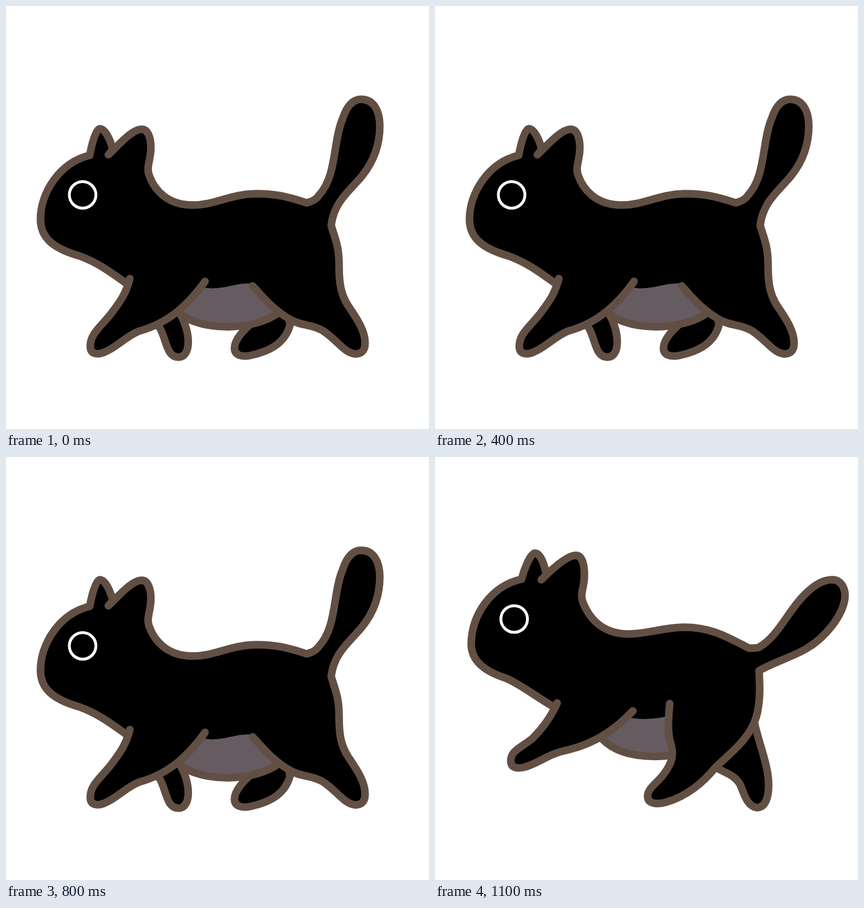
Animation, 748 px wide and 748 px high, one loop 1200 ms. Source, as an HTML page with a canvas:

```html
<!DOCTYPE html>
<html lang="en">
<head>
<meta charset="utf-8">
<title>Walking cat</title>
<style>
html, body { margin: 0; width: 100%; height: 100%; overflow: hidden; background: #fff; }
canvas { display: block; width: 748px; height: 748px; }
</style>
</head>
<body>
<canvas width="748" height="748"></canvas>
<script>
const ctx = document.querySelector('canvas').getContext('2d');
const FUR = '#000', LINE = '#624f44', BELLY = '#675b62';

// Every pose uses the same path commands, so two poses can be blended.
// body: chin, head, ears, back, tail; hind: rump and near hind leg; hem: upper belly edge
const contact = {
  eye: '135.5 334',
  body: 'M212 490C180 467 160 453 130 442C85 429 61 411 61 377C61 331 94 277 148 264C151 248 158 217 166 217C175 217 184 235 189 254L181 263C200 245 222 219 239 218C252 217 257 236 256 255C255 275 248 285 253 299C262 325 285 352 330 352C370 352 395 333 440 332C480 331 505 340 532 348C545 345 550 340 554 334C585 300 578 240 595 200C603 175 615 165 628 165C650 165 661 185 661 212C661 245 650 275 630 300C610 325 580 345 575 388',
  hind: 'C583 415 589 425 589 460C589 490 592 510 605 530C622 555 635 575 635 596C635 612 626 616 616 615C598 613 585 590 560 574C540 562 520 566 500 553C470 535 455 515 436 495',
  hem: 'L436 491C405 488 385 504 350 498',
  front: 'M219 482C212 510 200 525 185 545C165 570 149 580 149 602C149 615 160 617 172 613C195 605 210 585 235 575C290 560 325 525 352 487',
  farFront: 'M265 560C285 580 280 621 305 621C328 621 328 575 305 540L290 535',
  farHind: 'M450 545C430 565 404 585 404 605C404 618 418 621 432 618C460 612 492 600 502 565L500 545',
  belly: 'M345 477L300 535C330 577 440 577 485 540L445 477'
};

const down = {
  eye: '135.5 338',
  body: 'M230 497C190 480 162 458 130 446C85 433 61 414 61 381C61 333 94 280 147 267C151 251 158 220 166 220C175 220 184 238 189 257L181 266C200 248 222 221 238 221C252 220 257 240 255 258C254 278 248 290 252 302C262 328 285 354 330 354C370 354 395 335 440 333C480 332 505 342 535 349C545 346 552 342 560 336C592 305 592 250 612 212C622 190 638 179 655 179C675 180 683 198 682 218C681 261 659 297 628 324C601 348 580 361 575 392',
  hind: 'C583 420 584 445 579 470C574 490 562 505 564 525C567 550 572 560 569 580C567 600 558 614 542 614C528 614 526 600 522 585C517 565 515 560 495 552C455 535 428 505 422 465',
  hem: 'L428 492C405 490 390 506 354 501',
  front: 'M232 494C229 520 222 540 212 558C198 580 178 592 178 610C178 623 190 625 204 622C240 611 255 595 280 583C310 553 348 522 360 474',
  farFront: 'M275 582C290 596 305 599 316 597C331 592 330 572 316 558L300 550',
  farHind: 'M450 546C475 565 485 570 480 585C474 600 463 608 467 618C473 625 490 623 504 618C520 612 525 606 530 600L495 535',
  belly: 'M350 485L318 543C345 575 425 572 475 545L430 485'
};

const reach = {
  eye: '140 286.5',
  body: 'M212 443C180 425 150 401 125 391C88 379 64 361 64 330C65 279 99 228 153 216C157 201 168 170 177 170C186 170 193 188 197 208L188 217C205 200 232 175 248 174C262 173 265 195 264 215C262 238 256 242 262 258C275 290 300 312 340 313C375 313 400 302 440 301C490 301 520 320 555 338C562 338 568 338 572 337C607 318 625 270 655 242C672 225 688 217 702 217C720 217 726 235 725 248C722 280 690 320 655 340C630 354 595 365 573 378',
  hind: 'C575 410 575 435 568 460C556 500 520 525 495 550C475 575 445 600 410 610C390 616 376 612 376 600C376 585 395 575 405 560C420 540 424 525 415 500C411 480 413 460 415 436',
  hem: 'L413 458C395 462 375 465 352 462',
  front: 'M216 435C205 460 190 480 172 498C150 515 134 520 134 537C134 550 145 552 160 548C190 538 200 525 235 518C290 505 325 475 350 449',
  farFront: 'M270 470C275 490 280 490 285 490C290 490 290 480 285 470L275 465',
  farHind: 'M495 548C515 560 530 562 540 580C547 598 553 618 569 620C584 620 590 603 590 580C590 545 572 505 565 470L540 500',
  belly: 'M340 445L295 498C325 530 375 533 425 527L420 445'
};

const plant = {
  ...reach,
  body: reach.body.replace('M212 443C180 425', 'M225 456C190 430'),
  hind: 'C575 410 575 435 568 460C556 500 520 525 495 550C475 575 445 597 415 608C396 614 383 612 383 600C383 587 398 577 407 560C420 540 424 525 415 500C411 480 413 460 415 436',
  front: 'M225 456C245 480 262 505 264 530C266 555 258 575 258 600C258 615 264 620 272 620C288 620 296 605 304 585C318 555 354 510 354 429',
  farFront: 'M205 448C170 500 170 535 182 546C202 560 225 522 248 510L235 465',
  farHind: 'M495 548C515 560 535 565 545 583C553 600 560 616 575 620C590 620 597 605 597 585C597 550 578 510 567 470L540 500'
};

const NUM = /\d+(\.\d+)?/g;

// Pose halfway between a and b
function between(a, b) {
  const pose = {};
  for (const part in a) {
    const other = b[part].match(NUM);
    let i = 0;
    pose[part] = a[part].replace(NUM, n => (+n + +other[i++]) / 2);
  }
  return pose;
}

const liftReach = between(down, reach), liftPlant = between(down, plant);
const walk = [
  contact, down, liftReach, reach,
  contact, down, liftPlant, plant,
  contact, down, liftReach, reach
];

function shape(line, color, extra = '') {
  ctx.fillStyle = color;
  ctx.fill(new Path2D(line + extra));
  ctx.stroke(new Path2D(line));
}

function draw(pose) {
  ctx.fillStyle = '#fff';
  ctx.fillRect(0, 0, 748, 748);
  ctx.lineCap = ctx.lineJoin = 'round';
  ctx.lineWidth = 13.5;
  ctx.strokeStyle = LINE;
  shape(pose.farFront, FUR);
  shape(pose.farHind, FUR);
  shape(pose.belly, BELLY);
  shape(pose.body + pose.hind, FUR, pose.hem);
  shape(pose.front, FUR);

  const [x, y] = pose.eye.split(' ').map(Number);
  ctx.beginPath();
  ctx.arc(x, y, 23.5, 0, Math.PI * 2);
  ctx.lineWidth = 5;
  ctx.strokeStyle = '#fff';
  ctx.stroke();
}

const start = performance.now();
function tick() {
  const time = Math.max(0, performance.now() - start) % 1200;
  draw(walk[Math.floor(time / 100)]);
  requestAnimationFrame(tick);
}
tick();
</script>
</body>
</html>
```
